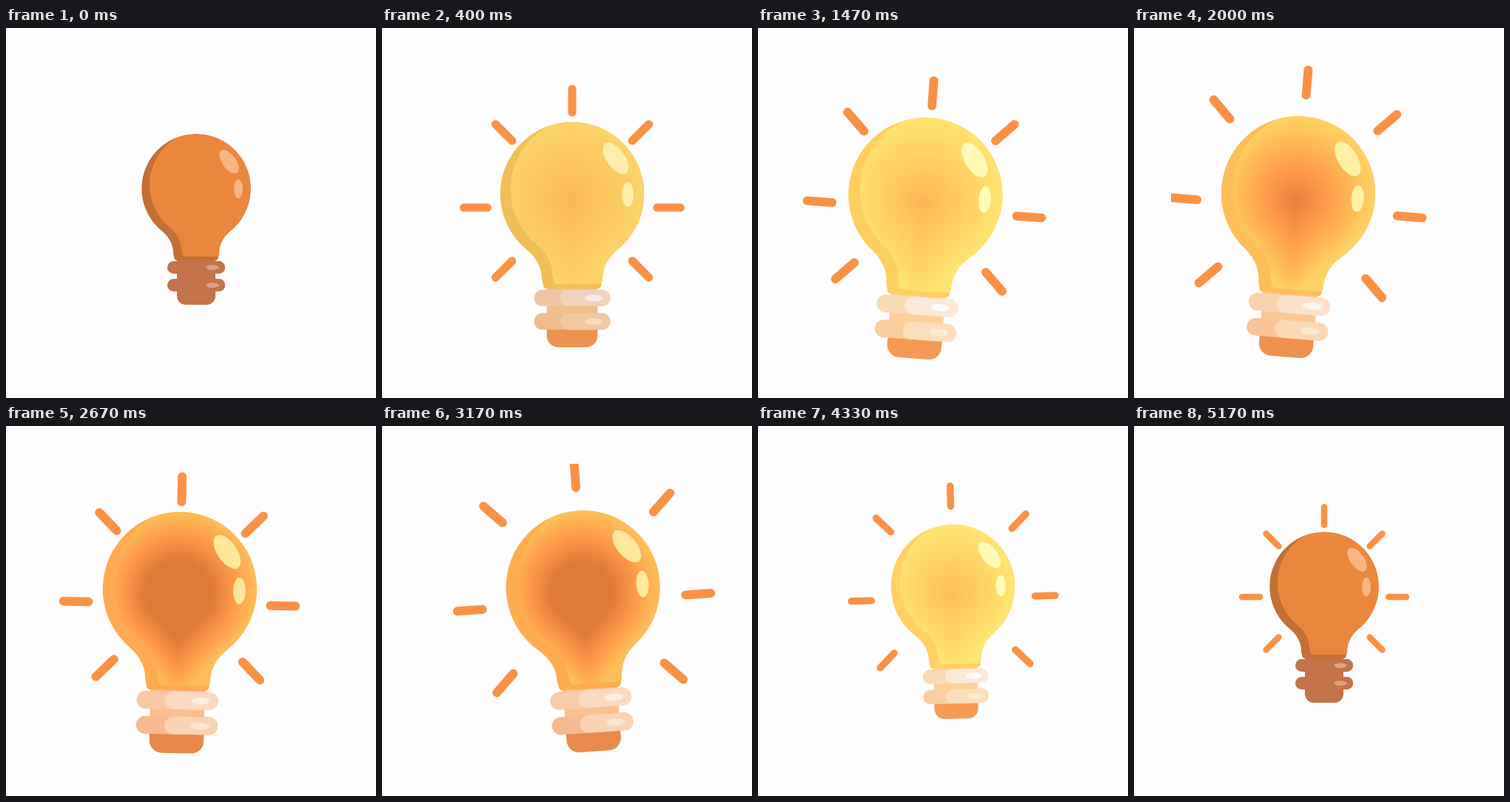
Recreate the animation shown at these times as an HTML page with a canvas. Size 500 px wide and 500 px high, loop 5.21 s.

```html
<!DOCTYPE html>
<html lang="en">
<head>
<meta charset="utf-8">
<title>Light bulb</title>
<style>
  html, body { margin: 0; width: 100%; height: 100%; overflow: hidden; background: #fefefe; }
  canvas { display: block; }
</style>
</head>
<body>
<canvas id="stage" width="500" height="500"></canvas>
<script>
const ctx = document.getElementById('stage').getContext('2d');
const LOOP = 5210;
const clamp = v => Math.min(1, Math.max(0, v));
const wave = v => 0.5 - 0.5 * Math.cos(Math.PI * v);

// Colours
const rgb = hex => [0, 2, 4].map(i => parseInt(hex.slice(i, i + 2), 16));
const blend = (a, b, u) => a.map((v, i) => v + (b[i] - v) * u);
const HEAT = ['ffe874', 'ffc45a', 'ff9a4a', 'e07a38'].map(rgb);
const GLASS = rgb('ea873d'), SHADE = rgb('c36f35'), BASE = rgb('c4734a');

function heat(v) {
  const p = clamp(v) * 3, i = Math.min(2, Math.floor(p));
  return blend(HEAT[i], HEAT[i + 1], p - i);
}

const bulb = new Path2D('M-46 57.5A73.7 73.7 0 1 1 46 57.5C36 66 31 76 31 88'
  + 'L30 92Q30 97 25 97H-25Q-30 97 -30 92L-31 88C-31 76 -36 66 -46 57.5Z');
const drop = new Path2D('M-54 50A73.7 73.7 0 1 1 54 50C36 66 20 84 8 98'
  + 'Q0 106 -8 98C-20 84 -36 66 -54 50Z');

function fill(colour, path) {
  ctx.fillStyle = `rgb(${colour.map(Math.round)})`;
  ctx.fill(path);
}
function ellipse(colour, x, y, rx, ry, turn = 0) {
  const path = new Path2D();
  path.ellipse(x, y, rx, ry, turn, 0, 7);
  fill(colour, path);
}
function box(colour, x, y, w, h, radii) {
  const path = new Path2D();
  path.roundRect(x, y, w, h, radii);
  fill(colour, path);
}

function drawRays(t) {
  const grow = clamp((t - 60) / 240);
  if (!grow) return;
  const pulse = t > 533 && t < 4800 ? wave(t / 533.3 + 1) : 0;
  ctx.strokeStyle = '#fb9145';
  ctx.lineWidth = 8.4;
  ctx.lineCap = 'round';
  ctx.beginPath();
  for (let i = -1; i < 6; i++) {
    const a = Math.PI * (1 + i / 4);
    const diagonal = i % 2, side = i % 4 === 0;
    const from = 87 + pulse * (diagonal ? 15.5 : 10.5);
    const to = from + 24 * grow;
    const y = side ? 14 : (diagonal ? 7 : 3.5) - 2 * pulse;
    ctx.moveTo(from * Math.cos(a), y + from * Math.sin(a));
    ctx.lineTo(to * Math.cos(a), y + to * Math.sin(a));
  }
  ctx.stroke();
}

// The glow is hottest in the middle and spreads outwards as warmth rises
function drawGlass(lit, warm, tint) {
  const layer = s => blend(GLASS, heat(0.33 * (1 - s) + warm * (1.2 - 0.8 * s)), lit);
  fill(blend(SHADE, heat(0.2 + 0.35 * warm), lit), bulb);
  ctx.save();
  ctx.clip(bulb);
  ctx.translate(11, -5);
  ctx.clip(bulb);
  ctx.translate(-11, 5);
  fill(layer(1), bulb);
  for (let s = 0.98; s > 0.03; s -= 0.025) {
    ctx.save();
    ctx.translate(-2 * (1 - s), 8 * (1 - s));
    ctx.scale(s, s);
    fill(layer(s), drop);
    ctx.restore();
  }
  ctx.restore();
  const shine = tint('fffcb8', 'ffe698', rgb('f9b484'));
  ellipse(shine, 44.5, -36.5, 18.5, 9.3, 0.95);
  ellipse(shine, 57, 0.5, 6, 12.7);
}

function drawCollar(y, edge, face, glint) {
  box(edge, -39, y, 78, 17, 8.5);
  box(face, -12, y, 51, 17, 8.5);
  ellipse(glint, 22, y + 8.6, 9, 3.4);
}

function drawBase(tint) {
  const glint = rgb('dea082');
  box(tint('fcd298', 'fbbf8c'), -26, 95, 52, 39, 0);
  box(tint('f79c54', 'e9894a'), -26, 131, 52, 26, [0, 0, 12, 12]);
  drawCollar(98, tint('fbdcb8', 'f9c8a4'), tint('fdebda', 'fcd9c0'),
    tint('ffffff', 'fdeee0', glint));
  drawCollar(122, tint('fad0a0', 'f7b88c'), tint('fbdfbc', 'fbd2b2'),
    tint('ffeccc', 'fce6d4', glint));
}

function draw(t) {
  const ease = (from, to) => wave(clamp((t - from) / (to - from)));
  const lit = ease(35, 560) - ease(4300, 5050);
  const warm = ease(1100, 2850) - ease(2850, 4600);
  const tint = (cool, hot, dim = BASE) => blend(dim, blend(rgb(cool), rgb(hot), warm), lit);

  // Grow, lean left, swing right, then shrink back to the middle
  const back = ease(3650, 4800);
  const x = 257 - 35 * ease(930, 1630) + 53 * ease(2350, 3330) - 18 * back;
  const y = 217 + 9.5 * (ease(35, 570) - ease(700, 4000));
  const angle = 4.6 * ease(800, 1630) - 9.1 * ease(2200, 3330) + 4.5 * back;
  const scale = 1 + 0.413 * (ease(35, 570) - ease(3600, 4800));

  ctx.fillStyle = '#fefefe';
  ctx.fillRect(0, 0, 500, 500);
  ctx.save();
  ctx.beginPath();
  ctx.rect(50, 51, 400, 399);
  ctx.clip();
  ctx.translate(x, y);
  ctx.rotate(angle * Math.PI / 180);
  ctx.scale(scale, scale);
  drawRays(t);
  drawBase(tint);
  drawGlass(lit, warm, tint);
  ctx.restore();
}

const start = performance.now();
function tick() {
  draw((performance.now() - start) % LOOP);
  requestAnimationFrame(tick);
}
tick();
</script>
</body>
</html>
```
